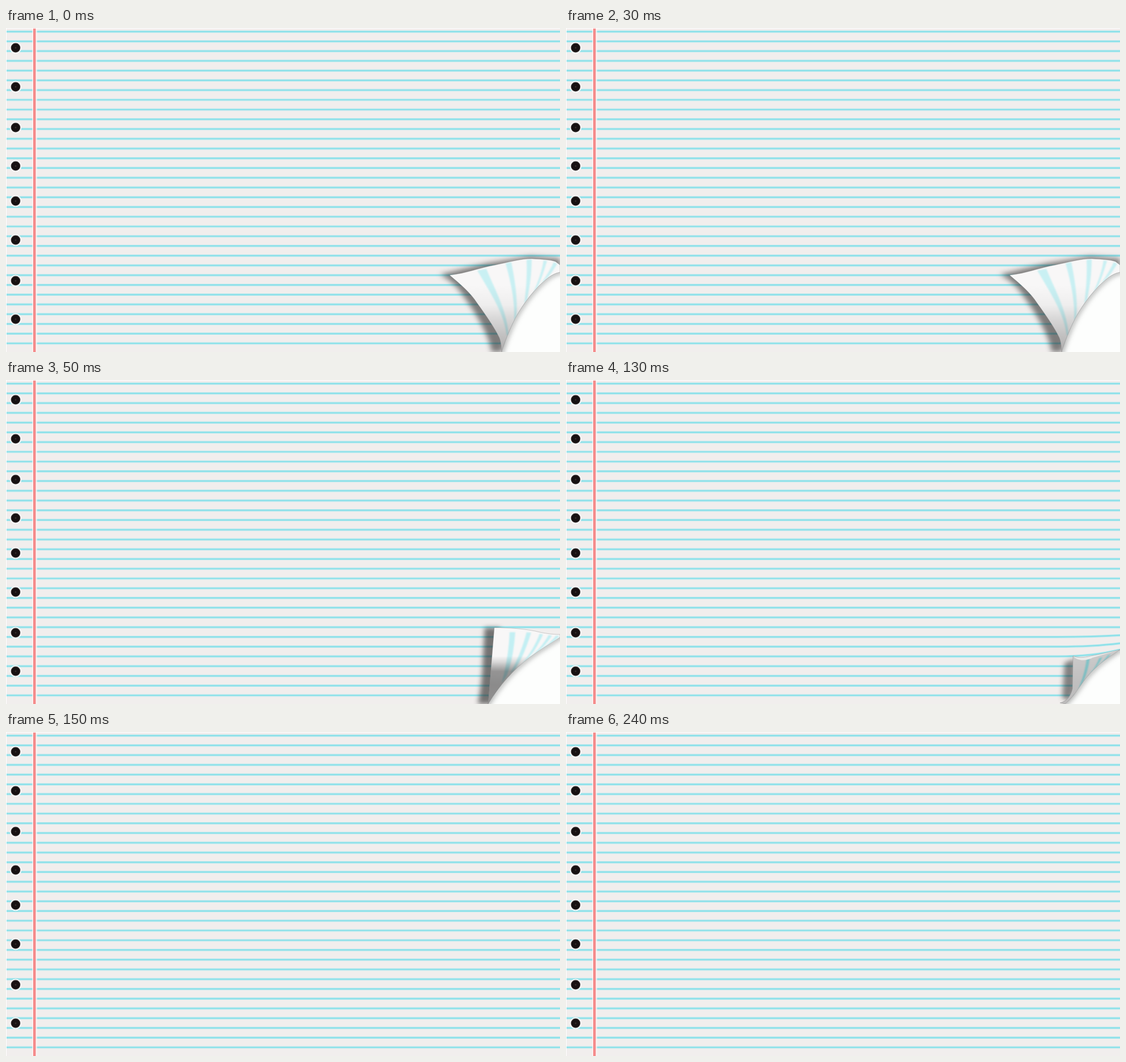
Animation of 978x573 px, one loop 0.3 s. Source, as an HTML page with a canvas:

```html
<!DOCTYPE html>
<html lang="en">
<head>
<meta charset="utf-8">
<title>Page turn</title>
<style>
html, body { margin: 0; width: 100%; height: 100%; overflow: hidden; background: #fff; }
canvas { display: block; }
</style>
</head>
<body>
<canvas id="stage" width="978" height="573"></canvas>
<script>
const W = 978, H = 573, LOOP = 300, STEP = 50;
const ctx = document.getElementById('stage').getContext('2d');
const HOLES = [35, 104, 176, 244, 306, 375, 447, 515];

// Each pose: revealed corner, turned-over flap, its cast shadow and ruled stripes.
const POSES = [
  {
    corner: 'M978 432 C964 434 951 446 939 458 C920 478 901 505 889 535 C883 549 878 562 875 573 H978 Z',
    flap: 'M783 437 C812 434 836 424 864 419 C888 414 908 408 928 408 C946 409 962 410 970 413 L978 419 V432 C964 434 951 446 939 458 C920 478 901 505 889 535 C883 549 878 562 875 573 C874 562 874 556 871 548 C862 529 847 508 832 487 C819 467 804 455 783 437 Z',
    shadow: 'M766 436 L850 416 L925 404 L978 408 V440 L900 510 L875 573 H857 C855 548 832 508 812 480 C800 462 790 448 766 436 Z',
    shadowAlpha: 0.58, blur: 5,
    stripes: [
      'M832 429 L848 426 C862 461 884 498 887 541 L884 545 C880 505 856 470 832 429 Z',
      'M882 416 L892 414 C898 444 904 480 901 511 L897 519 C899 481 890 446 882 416 Z',
      'M919 410 L928 409 C928 434 925 455 920 481 L915 487 C919 455 920 432 919 410 Z',
      'M949 411 L955 412 C949 432 944 447 937 461 L931 468 C940 446 946 430 949 411 Z',
      'M967 414 L973 417 C966 429 959 440 948 449 L944 453 C954 438 961 427 967 414 Z'
    ],
    shade: [455, 573, [[0, 0], [0.3, 0.04], [0.5, 0.13], [0.75, 0.22], [1, 0.3]]],
    paper: '#f8f7f7', stripe: '#c9f0f3'
  },
  {
    corner: 'M978 455 C960 467 942 477 925 490 C896 512 871 540 851 573 H978 Z',
    flap: 'M862 438 C890 438 913 440 934 444 C950 448 964 450 978 450 V455 C960 467 942 477 925 490 C896 512 871 540 851 573 L856 512 Z',
    shadow: 'M845 438 H872 V573 H833 Q841 535 842 490 Z',
    shadowAlpha: 0.62, blur: 4,
    stripes: [
      'M889 446 H899 C897 474 893 500 884 523 L875 536 C884 503 888 473 889 446 Z',
      'M919 446 L927 447 C919 472 911 493 899 511 L890 519 C904 493 913 470 919 446 Z',
      'M942 449 L948 450 C939 470 929 485 918 496 L911 502 C925 484 935 468 942 449 Z',
      'M958 451 L964 452 C954 466 945 477 934 484 L927 489 C941 476 950 465 958 451 Z',
      'M971 452 L977 453 C967 463 959 469 948 475 L943 478 C955 469 963 462 971 452 Z'
    ],
    shade: [488, 573, [[0, 0], [0.12, 0.12], [0.32, 0.4], [0.6, 0.44], [1, 0.42]]],
    paper: '#f8f7f7', stripe: '#c3eff3'
  },
  {
    corner: 'M978 477 C958 490 942 501 926 518 C909 536 900 557 881 573 H978 Z',
    flap: 'M895 488 C904 492 915 491 926 488 C945 485 963 480 978 477 C958 490 942 501 926 518 C909 536 900 557 881 573 L872 571 C885 568 891 558 894 546 Z',
    shadow: 'M880 500 L899 493 V550 L888 568 L876 562 Z',
    shadowAlpha: 0.55, blur: 4,
    stripes: [
      'M919 492 L925 491 C922 511 917 528 909 541 L903 549 C912 530 917 511 919 492 Z',
      'M941 492 L947 490 C940 503 934 512 926 519 L920 525 C931 513 937 503 941 492 Z',
      'M956 487 L962 485 C956 493 948 500 940 505 L934 510 C944 502 951 494 956 487 Z'
    ],
    shade: [488, 573, [[0, 0], [0.5, 0.05], [1, 0.08]]],
    paper: '#cbcaca', stripe: '#83c5c9', rim: true,
    bend: { 26: 3, 27: 6, 28: 12 }
  }
];
for (const p of POSES) {
  for (const key of ['corner', 'flap', 'shadow']) p[key] = new Path2D(p[key]);
  p.stripes = p.stripes.map(d => new Path2D(d));
}

function rule(y, lift, width, color) {
  ctx.beginPath();
  ctx.moveTo(1, y);
  ctx.lineTo(868, y);
  ctx.quadraticCurveTo(930, y, W, y - lift);
  ctx.lineWidth = width;
  ctx.strokeStyle = color;
  ctx.stroke();
}

function disc(x, y, r, color) {
  ctx.fillStyle = color;
  ctx.beginPath();
  ctx.arc(x, y, r, 0, Math.PI * 2);
  ctx.fill();
}

function drawSheet(bend = {}) {
  ctx.fillStyle = '#fff';
  ctx.fillRect(0, 0, W, H);
  ctx.fillStyle = '#f1eeed';
  ctx.fillRect(1, 1, W, H);
  for (let i = 0; i < 33; i++) {
    const y = 6.4 + i * 17.23, lift = bend[i] || 0;
    rule(y, lift, 5, 'rgba(190,236,241,.55)');
    rule(y, lift, 2.7, '#8ee1e9');
  }
  ctx.fillStyle = 'rgba(255,246,245,.7)';
  ctx.fillRect(46, 1, 9, H);
  ctx.fillStyle = '#f58b8b';
  ctx.fillRect(48, 1, 4.5, H);
  for (const y of HOLES) {
    disc(17, y, 10.5, 'rgba(250,249,249,.85)');
    disc(17, y, 8.4, '#4b4444');
    disc(17, y, 7.6, '#171112');
    disc(17, y, 1.5, '#332b2b');
  }
}

function clipped(path, draw) {
  ctx.save();
  ctx.clip(path);
  draw();
  ctx.restore();
}

function drawCurl(p) {
  ctx.save();
  ctx.filter = `blur(${p.blur}px)`;
  ctx.fillStyle = `rgba(40,40,40,${p.shadowAlpha})`;
  ctx.fill(p.shadow);
  ctx.restore();

  ctx.fillStyle = '#fdfefd';
  ctx.fill(p.corner);
  clipped(p.corner, () => {
    ctx.filter = 'blur(4px)';
    ctx.strokeStyle = 'rgba(60,60,60,.4)';
    ctx.lineWidth = 7;
    ctx.stroke(p.flap);
  });

  ctx.fillStyle = p.paper;
  ctx.fill(p.flap);
  clipped(p.flap, () => {
    ctx.filter = 'blur(0.8px)';
    ctx.fillStyle = p.stripe;
    for (const s of p.stripes) ctx.fill(s);
    ctx.filter = 'none';
    if (p.rim) {
      ctx.fillStyle = '#ececeb';
      ctx.fill(new Path2D('M895 488 C904 498 918 497 930 491 L978 477 L926 486 Z'));
    }
    const [top, bottom, stops] = p.shade;
    const g = ctx.createLinearGradient(0, top, 0, bottom);
    for (const [at, alpha] of stops) g.addColorStop(at, `rgba(0,0,0,${alpha})`);
    ctx.fillStyle = g;
    ctx.fillRect(700, top, W, H);
  });
  ctx.strokeStyle = 'rgba(110,110,110,.4)';
  ctx.lineWidth = 0.8;
  ctx.stroke(p.flap);
}

let start;
function frame(now) {
  start ??= now;
  const pose = POSES[Math.floor(((now - start) % LOOP) / STEP)];
  drawSheet(pose?.bend);
  if (pose) drawCurl(pose);
  requestAnimationFrame(frame);
}
requestAnimationFrame(frame);
</script>
</body>
</html>
```
